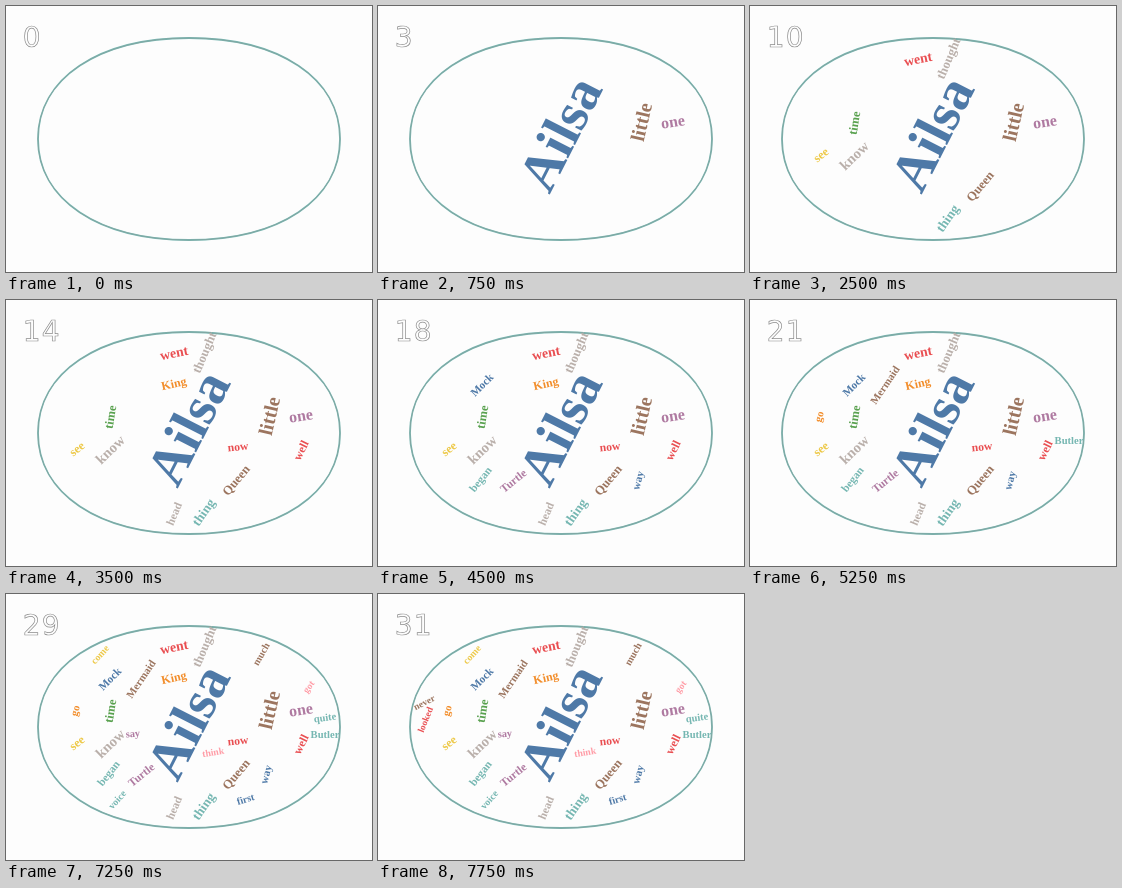
An HTML page with a canvas for the animation above (8000 ms loop, 366 by 266 pixels).

```html
<!DOCTYPE html>
<html lang="en">
<head>
<meta charset="utf-8">
<title>Growing word cloud</title>
<style>
  html, body { margin: 0; height: 100%; overflow: hidden; background: #fdfdfd; }
  canvas { display: block; }
</style>
</head>
<body>
<canvas id="stage" width="366" height="266"></canvas>
<script>
const ctx = document.getElementById('stage').getContext('2d');
const STEP = 250, LOOP = 8000;

const blue = '#4e79a7', orange = '#f28e2c', red = '#e94f52', teal = '#76b7b2',
      green = '#59a14f', yellow = '#edc949', purple = '#af7aa1', pink = '#ff9da7',
      brown = '#9c755f', gray = '#bab0ab';

// Text, centre x, centre y, angle in degrees, colour; most frequent word first.
const words = [
  ['Ailsa', 182, 127.5, -63, blue],
  ['little', 263.5, 116, -77, brown],
  ['one', 295, 117, -9, purple],
  ['know', 104, 149.5, -44, gray],
  ['went', 168, 53, -11, red],
  ['thing', 198.5, 213, -55, teal],
  ['thought', 199.5, 53, -67, gray],
  ['Queen', 231, 181, -50, brown],
  ['time', 104, 117, -81, green],
  ['see', 71.5, 149.5, -38, yellow],
  ['King', 168, 84.5, -13, orange],
  ['well', 294.5, 150, -64, red],
  ['now', 232, 147.5, -6, red],
  ['head', 167.5, 213.5, -67, gray],
  ['Turtle', 135.5, 181, -39, purple],
  ['began', 103.5, 180, -52, teal],
  ['Mock', 104, 85, -45, blue],
  ['way', 262, 181, -75, blue],
  ['Mermaid', 135, 85, -56, brown],
  ['go', 70.5, 117, -75, orange],
  ['Butler', 319, 140.5, 0, teal],
  ['quite', 319, 124.5, -8, teal],
  ['say', 127, 141.5, -4, purple],
  ['much', 255, 60, -60, brown],
  ['first', 239.5, 205, -17, blue],
  ['voice', 111, 205.5, -48, teal],
  ['come', 94.5, 61, -48, yellow],
  ['think', 207, 158, -10, pink],
  ['got', 303.5, 93.5, -54, pink],
  ['never', 46.5, 109, -27, brown],
  ['looked', 47, 125.5, -68, red]
];

const fontSize = rank => rank ? 12.4 + 7.6 / rank - 0.11 * rank : 55;

function drawWord([text, x, y, angle, color], rank) {
  ctx.save();
  ctx.translate(x, y);
  ctx.rotate(angle * Math.PI / 180);
  ctx.font = `bold ${fontSize(rank)}px "Liberation Serif", serif`;
  ctx.textAlign = 'center';
  ctx.fillStyle = color;
  const box = ctx.measureText(text);
  ctx.fillText(text, 0, (box.actualBoundingBoxAscent - box.actualBoundingBoxDescent) / 2);
  ctx.restore();
}

// Rounded oval: one Bézier per quadrant, fuller than an ellipse.
function ovalPath(cx, cy, rx, ry, bulge) {
  const path = new Path2D();
  path.moveTo(cx + rx, cy);
  for (let i = 0; i < 4; i++) {
    const [ux, uy] = [[1, 0], [0, 1], [-1, 0], [0, -1]][i];
    const [vx, vy] = [-uy, ux];
    path.bezierCurveTo(
      cx + rx * (ux + bulge * vx), cy + ry * (uy + bulge * vy),
      cx + rx * (vx + bulge * ux), cy + ry * (vy + bulge * uy),
      cx + rx * vx, cy + ry * vy);
  }
  return path;
}
const oval = ovalPath(183, 133, 151, 101, 0.6);

function drawOutline(color, width) {
  ctx.strokeStyle = color;
  ctx.lineWidth = width;
  ctx.stroke(oval);
}

function drawCounter(count) {
  ctx.font = '28px "DejaVu Sans", sans-serif';
  ctx.letterSpacing = '1.3px';
  ctx.textAlign = 'left';
  ctx.strokeStyle = '#8a8a8a';
  ctx.lineWidth = 0.7;
  ctx.strokeText(count, 16.7, 40.5);
  ctx.letterSpacing = '0px';
}

function render(now) {
  const count = Math.floor(now % LOOP / STEP);
  ctx.fillStyle = '#fdfdfd';
  ctx.fillRect(0, 0, 366, 266);
  drawOutline(teal, 1.8);
  drawOutline('#8a9a98', 0.6);
  words.slice(0, count).forEach(drawWord);
  drawCounter(count);
}

function tick() {
  render(performance.now());
  requestAnimationFrame(tick);
}
tick();
</script>
</body>
</html>
```
